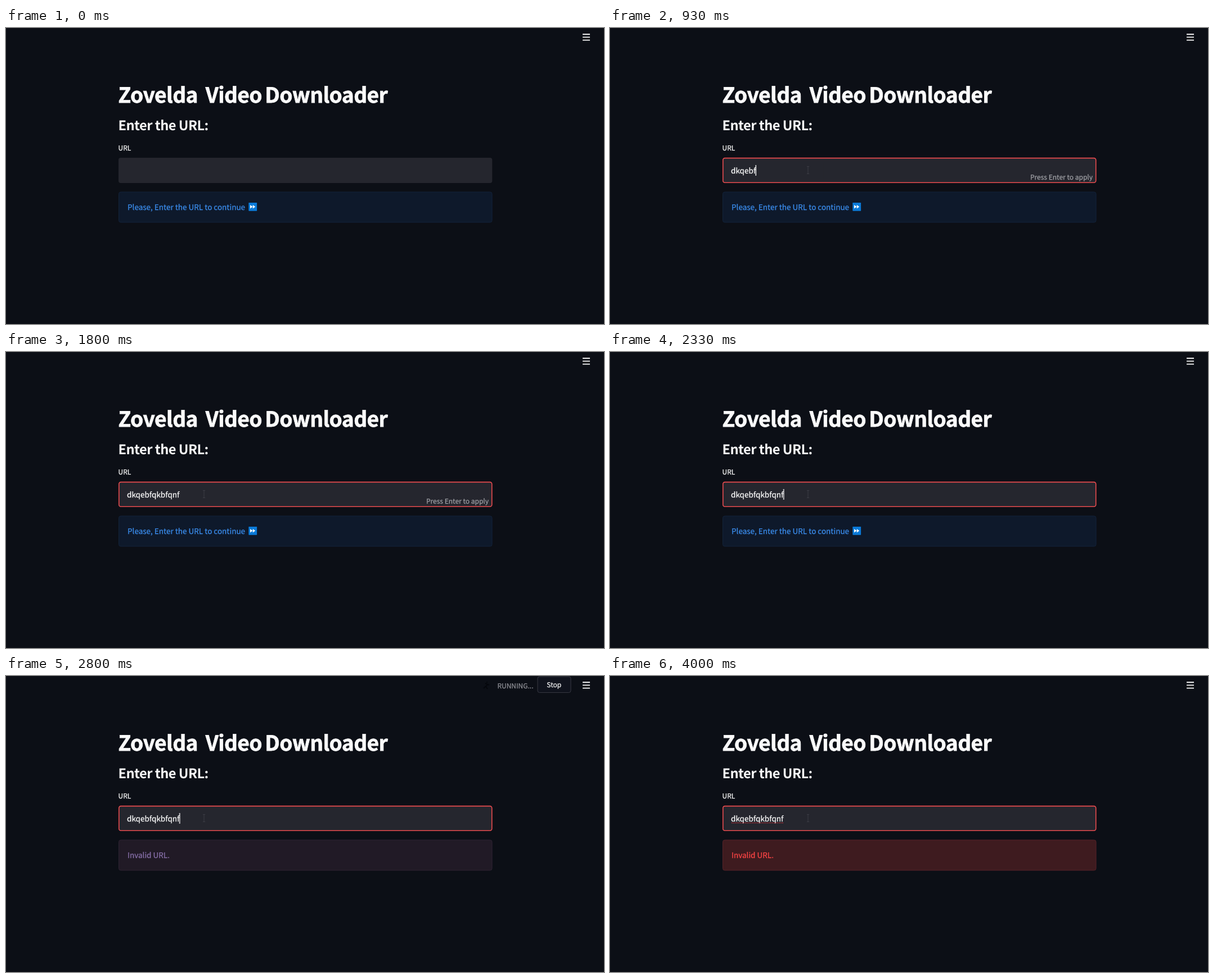
An HTML page for the animation above (4.32 s loop, 1063x527 px).

```html
<!DOCTYPE html>
<html lang="en">
<head>
<meta charset="utf-8">
<title>Video Downloader</title>
<style>
  html, body { margin: 0; width: 100%; height: 100%; overflow: hidden; background: #0c0f16; }
  svg { display: block; color: #fafafa; }
  text {
    font: 13.52px "Noto Sans CJK JP", "Noto Sans CJK SC", "Noto Sans CJK", "Open Sans", sans-serif;
    fill: currentColor;
    stroke: currentColor;
    stroke-width: .25;
    text-rendering: geometricPrecision;
    white-space: pre;
  }
  .title { font-size: 37.15px; font-weight: 700; letter-spacing: -.55px; stroke-width: .8; }
  .header { font-size: 23.6px; font-weight: 700; letter-spacing: -.53px; stroke-width: 0; }
  .small { font-size: 12px; }
  .muted { color: #94959b; }
  .end { text-anchor: end; }
  .mid { text-anchor: middle; }

  /* One shared 4.32 s clock: hard switches by default, fades where marked */
  .focus, .mouse, .hint, .value, .cover, .caret, .spell, .prompt, .invalid, .status, .box, .head {
    animation: 4.32s step-end infinite;
  }
  .focus { animation-name: focus; animation-timing-function: linear; }
  .mouse { animation-name: mouse; }
  .hint { animation-name: hint; color: #a0a1a6; }
  .value { animation-name: value; }
  .cover { animation-name: cover; }
  .caret { animation-name: caret; }
  .spell { animation-name: spell; }
  .prompt { animation-name: prompt; color: #3b8ded; }
  .invalid { animation-name: invalid, redden; animation-timing-function: step-end, linear; }
  .status { animation-name: status; animation-timing-function: linear; }
  .box { animation-name: box; animation-timing-function: linear; }
  .head { animation-name: type; }

  @keyframes focus { 0%, 9.2% { opacity: 0 } 12.3%, 100% { opacity: 1 } }
  @keyframes mouse { 0% { opacity: 0 } 9.25%, 100% { opacity: 1 } }
  @keyframes value { 0% { opacity: 0 } 13.87%, 100% { opacity: 1 } }
  @keyframes hint { 0% { opacity: 0 } 13.87% { opacity: 1 } 46.28%, 100% { opacity: 0 } }
  @keyframes cover { 0% { opacity: 1 } 30.76%, 100% { opacity: 0 } }
  @keyframes caret {
    0%, 41.65%, 66.18%, 90.95%, 100% { opacity: 0 }
    9.25%, 53.92%, 78.68% { opacity: 1 }
  }
  @keyframes spell { 0% { opacity: 0 } 66.18%, 100% { opacity: 1 } }
  @keyframes prompt { 0% { opacity: 1 } 61.78%, 100% { opacity: 0 } }
  @keyframes invalid { 0% { opacity: 0 } 61.78%, 100% { opacity: 1 } }
  @keyframes redden { 0%, 61.8% { color: #3b8ded } 69.4%, 100% { color: #fb4545 } }
  @keyframes box {
    0%, 61.8% { fill: #0e192b; stroke: #13233a }
    69.4%, 100% { fill: #3e1b1f; stroke: #562328 }
  }
  @keyframes status {
    0%, 57% { opacity: 0 }
    61.7%, 64.8% { opacity: 1 }
    66.2%, 100% { opacity: 0 }
  }
</style>
</head>
<body>
<svg width="1063" height="527" viewBox="0 0 1063 527">
  <path d="M1025 11.2h13M1025 16.4h13M1025 21.6h13" stroke="#fafafa" stroke-width="1.9"/>

  <g class="status">
    <path d="M855 10v2M852 13l4 2-3 4 3 4M853 18l-4 4M856 15l3 1" fill="none" stroke="#05070c" stroke-width="2"/>
    <text class="small muted end" x="937.5" y="21.9">RUNNING...</text>
    <rect x="945" y="1" width="59" height="28.5" rx="3.5" fill="#11141e" stroke="#383a43"/>
    <text class="small mid" x="974.3" y="19.9">Stop</text>
  </g>

  <text class="title" y="133"><tspan x="199.5">Zovelda</tspan> <tspan x="354.8">Video</tspan> <tspan x="460.3">Downloader</tspan></text>
  <text class="header" x="199.5" y="182.3">Enter the URL:</text>
  <text class="small" x="199.5" y="217.6">URL</text>

  <rect x="200" y="231" width="664.3" height="45" rx="4" fill="#25262e"/>
  <text class="value" id="value" x="215" y="258.8">dkqebfqkbfqnf</text>
  <path class="spell" d="M216 261.5H309" stroke="#d8343a" stroke-dasharray="2 1"/>
  <g class="head">
    <rect class="cover" x="215" y="240" width="120" height="28" fill="#25262e"/>
    <rect class="caret" x="214.6" y="244" width="1.4" height="19" fill="#fafafa"/>
  </g>
  <path class="mouse" d="M350 246.5h4M352 246.5v13M350 259.5h4" fill="none" stroke="#3c3d45"/>
  <text class="hint small end" x="858" y="270.4">Press Enter to apply</text>
  <rect class="focus" x="200.8" y="231.6" width="662.9" height="43.7" rx="3.5" fill="none" stroke="#e84a4d" stroke-width="1.6"/>

  <rect class="box" x="200.5" y="292" width="663.5" height="54" rx="3.5"/>
  <g class="prompt">
    <text x="216" y="323.5">Please, Enter the URL to continue</text>
    <rect x="431.3" y="311" width="14.8" height="14.7" rx=".6" fill="#0a7ad8"/>
    <path d="M434 315l4.5 3.3-4.5 3.3zM438.7 315l4.5 3.3-4.5 3.3z" fill="#fff"/>
  </g>
  <text class="invalid" x="216" y="323.5">Invalid URL.</text>
</svg>
<script>
  // [time in ms, letters typed]; the caret advances by the measured text width
  const strokes = [
    [0, 0], [600, 1], [666, 2], [733, 3], [800, 4], [860, 5], [930, 6],
    [1000, 7], [1066, 8], [1133, 9], [1200, 11], [1266, 12], [1330, 13]
  ];
  const loop = 4320;
  const value = document.getElementById("value");
  const width = n => n ? value.getSubStringLength(0, n) : 0;
  const percent = ms => Math.max(0, (ms - 1) / loop * 100).toFixed(3);
  const shift = n => `{ transform: translateX(${width(n).toFixed(2)}px) }`;

  const sheet = document.createElement("style");
  sheet.textContent = `@keyframes type {
    ${strokes.map(([ms, n]) => `${percent(ms)}% ${shift(n)}`).join("\n")}
    100% ${shift(13)}
  }`;
  document.head.append(sheet);
</script>
</body>
</html>
```
